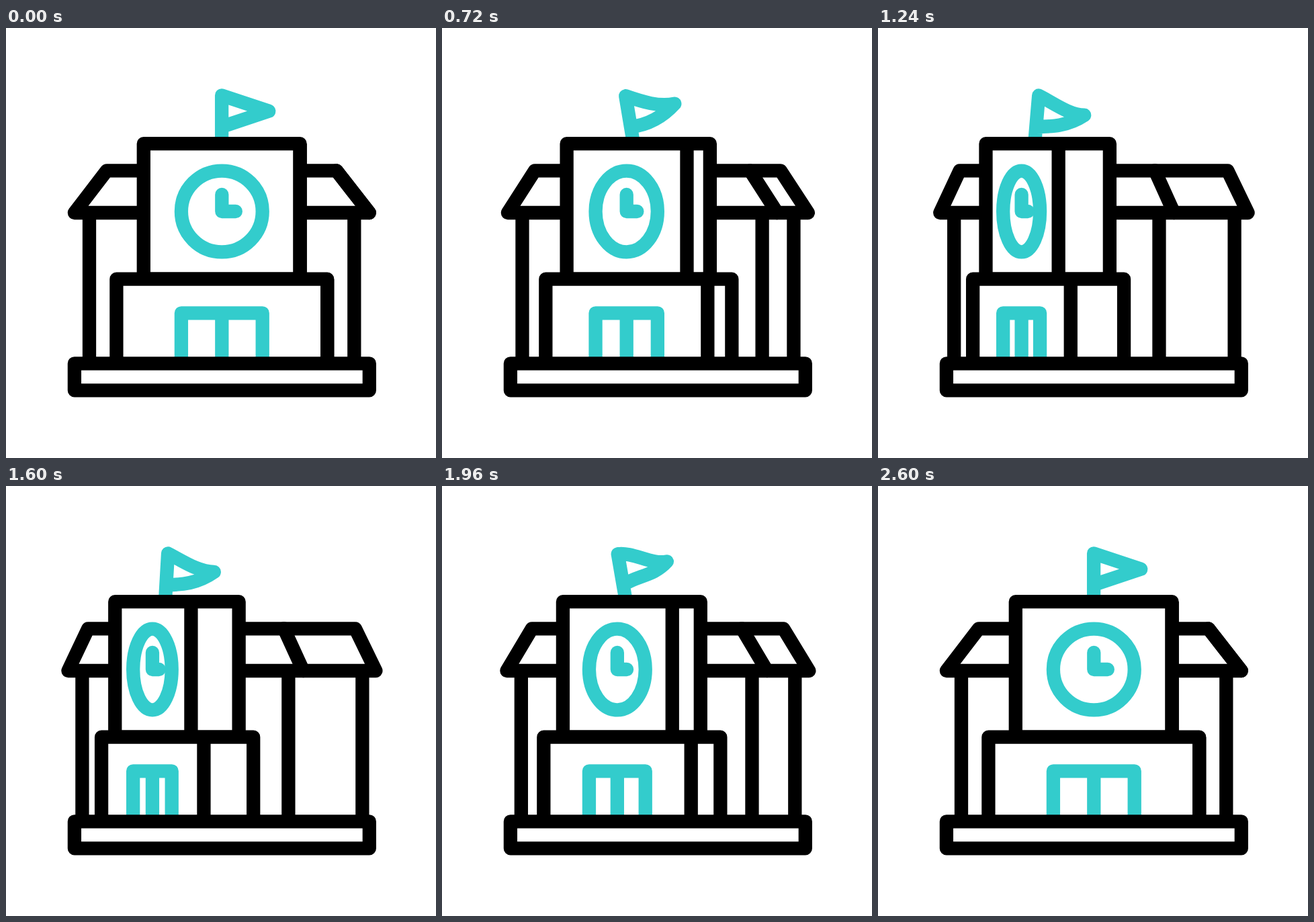
Recreate the animation shown at these times as an HTML page. Size 640 by 640 pixels, loop 3000 ms.

```html
<!DOCTYPE html>
<html lang="en">
<head>
<meta charset="utf-8">
<title>Turning school</title>
<style>
  html, body { margin: 0; width: 100%; height: 100%; overflow: hidden; background: #fff; }
  svg { display: block; width: 100vw; height: 100vh; }
  path, ellipse { fill: none; stroke: #000; stroke-width: 20.3; stroke-linejoin: round; }
  .solid { fill: #fff; }
  .teal { stroke: #3cc; }
  .round { stroke-linecap: round; }
</style>
</head>
<body>
<svg viewBox="0 0 640 640">
  <path id="flag" class="teal"/>
  <path id="roof" class="solid"/>
  <path id="ridge" class="round"/>
  <path id="pillars"/>
  <path id="tower" class="solid"/>
  <path id="towerEdge"/>
  <ellipse id="clock" class="teal" cy="273" ry="60.4"/>
  <path id="hands" class="teal round"/>
  <path id="podium" class="solid"/>
  <path id="podiumEdge"/>
  <path id="door" class="teal"/>
  <path class="solid" d="M101.9 499.3H540.8V539.4H101.9Z"/>
</svg>
<script>
const LOOP = 3000, STEP = 20;
const $ = id => document.getElementById(id);
const draw = (id, d) => $(id).setAttribute('d', d);

// Eased value at time t through [time, value] keys.
function ease(t, keys) {
  if (t <= keys[0][0]) return keys[0][1];
  for (let i = 1; i < keys.length; i++) {
    const [t0, a] = keys[i - 1], [t1, b] = keys[i];
    if (t < t1) {
      const u = (t - t0) / (t1 - t0);
      return a + (b - a) * u * u * (3 - 2 * u);
    }
  }
  return keys[keys.length - 1][1];
}

const FRONT = [[188, 0], [1390, 1], [2590, 0]];
const SIDE = [[200, 0], [1410, 1], [2570, 0]];
const SWING = [[200, 0], [800, -10], [1400, 8], [2000, -10], [2600, 0]];
const WAVE = [[200, 0], [660, 6], [1000, -7], [1400, 6], [2000, -7], [2600, 0]];
const SAG = [[200, 0], [520, 9], [2000, 9], [2600, 0]];

function drawFlag(t, p) {
  const near = ease(t, WAVE), far = ease(t, SAG);
  const low = near + far * 0.45, tip = far * 1.2;
  draw('flag', `M0 10V-61.7C23.3 ${-53.9 + near} 46.7 ${-46 + far} 70.2 -38.3` +
    `C46.7 ${-30.5 + tip} 23.3 ${-22.8 + low} 0 -15V-61.7Z`);
  $('flag').setAttribute('transform',
    `translate(${321.1 - 91 * p} 162) rotate(${ease(t, SWING)})`);
}

function render(t) {
  const p = ease(t, FRONT), q = ease(t, SIDE);
  const mid = 321.3 - 112.5 * p, squash = 1 - 0.57 * p, half = 60.4 * squash;

  drawFlag(t, p);

  draw('roof', `M${150 - 30 * q} 212.3H${492 + 30 * q}L${540.8 + 10.3 * q} 275` +
    `H${101.9 - 10.2 * q}Z`);
  draw('ridge', `M${491.7 - 84 * q} 212.3L${540.8 - 106 * q} 275`);
  draw('pillars', [124 - 11.4 * q, 518.3 - 105.5 * q, 518.3 + 13 * q]
    .map(x => `M${x} 275V499`).join(''));

  draw('tower', `M${204.8 - 46.3 * p} 373.6V172.2H${437.6 - 98 * q}V373.6Z`);
  draw('towerEdge', `M${437.6 - 176.5 * p} 172.2V373.6`);
  $('clock').setAttribute('cx', mid);
  $('clock').setAttribute('rx', half);
  draw('hands', `M${mid} 248V273H${mid + 20.5 * squash}`);

  draw('podium', `M${164.4 - 24.3 * p} 499V373.7H${478.2 - 118.5 * q}V499`);
  draw('podiumEdge', `M${478.2 - 200 * p} 373.7V499`);
  draw('door', `M${mid - half} 499V424.3H${mid + half}V499M${mid} 424.3V499`);
}

function tick() {
  const t = performance.now() % LOOP;
  render(Math.floor(t / STEP) * STEP);
  requestAnimationFrame(tick);
}
tick();
</script>
</body>
</html>
```
